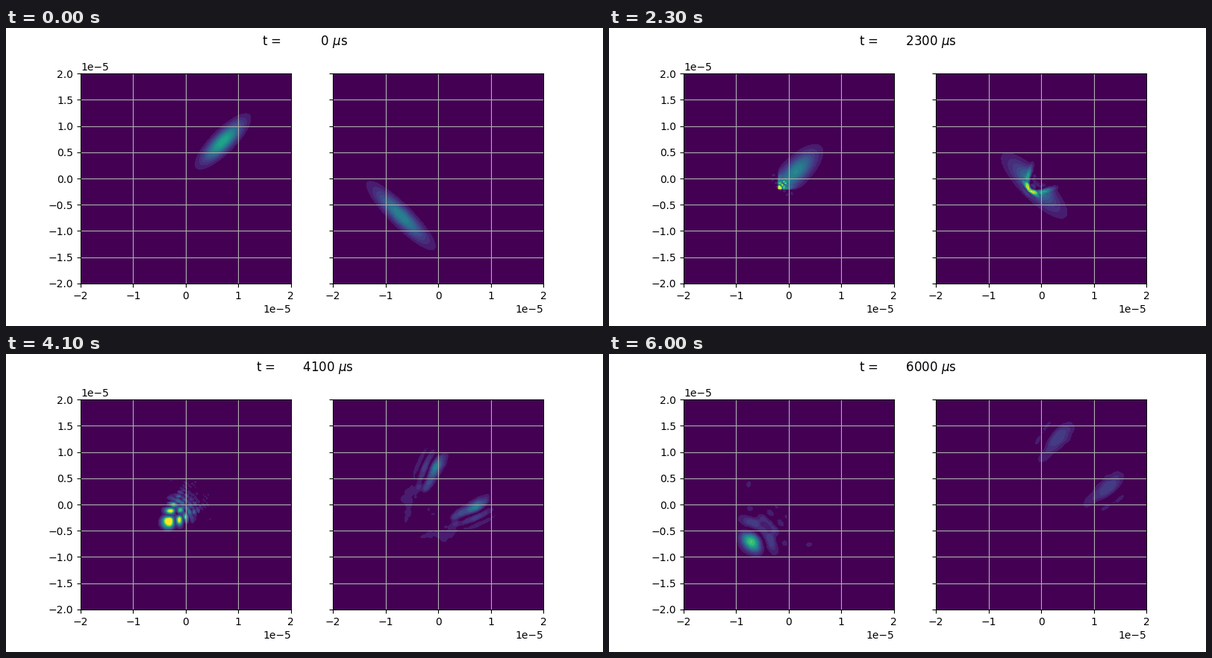
These frames come from a looping animation (800x400 px, 6100 ms). A matplotlib script:

```python
import numpy as np
import matplotlib.pyplot as plt
from matplotlib.animation import FuncAnimation

# Two matter waves that repel each other; lengths in um, times in ms.
FRAMES = 61
STEP = 0.1            # simulated time between frames
SUBSTEPS = 25
CONTACT = 1.2         # before this time the clouds do not overlap
HBAR_M = 0.73         # hbar / mass
SPEED = 2.5           # along each axis
OFFSET = 7.07
REPULSION = 75.0
N, HALF = 144, 22.0

axis = np.linspace(-HALF, HALF, N, endpoint=False)
X, Y = np.meshgrid(axis, axis)
k = 2 * np.pi * np.fft.fftfreq(N, axis[1] - axis[0])
K2 = k[None, :] ** 2 + k[:, None] ** 2


def packet(center, sigma_along, sigma_across, speed):
    """Gaussian cloud on the diagonal, moving along it."""
    along = (X + Y - 2 * center) / np.sqrt(2)
    across = (X - Y) / np.sqrt(2)
    peak = 1.92 / (sigma_along * sigma_across)
    shape = (along / sigma_along) ** 2 + (across / sigma_across) ** 2
    wave = np.exp(1j * speed / HBAR_M * (X + Y))
    return np.sqrt(peak) * np.exp(-shape / 4) * wave


def density(psi):
    return psi.real ** 2 + psi.imag ** 2


def drift(psi, phase):
    return np.fft.ifft2(np.fft.fft2(psi) * phase)


def simulate():
    psi = np.array([packet(OFFSET, 3.2, 1.0, -SPEED),
                    packet(-OFFSET, 1.0, 4.3, SPEED)])
    dt = STEP / SUBSTEPS
    free = np.exp(-0.5j * HBAR_M * K2 * STEP)
    full = np.exp(-0.5j * HBAR_M * K2 * dt)
    half = np.exp(-0.25j * HBAR_M * K2 * dt)
    history = [density(psi)]
    for frame in range(1, FRAMES):
        if frame * STEP <= CONTACT:
            psi = drift(psi, free)
        else:
            psi = drift(psi, half)
            for i in range(SUBSTEPS):
                # each cloud feels the density of the other one
                psi = psi * np.exp(-1j * dt * REPULSION * density(psi)[::-1])
                psi = drift(psi, full if i < SUBSTEPS - 1 else half)
        history.append(density(psi))
    return history


history = simulate()

fig, axes = plt.subplots(1, 2, sharey=True, figsize=(8, 4), dpi=100)
cmap = plt.get_cmap("viridis")
levels = np.linspace(0.05, 1, 20)
for ax in axes:
    ax.set_aspect("equal")
    ax.set_xlim(-2e-5, 2e-5)
    ax.set_ylim(-2e-5, 2e-5)
    ax.set_facecolor(cmap(0.0))
    ax.grid(True)
title = fig.suptitle("")
clouds = []


def draw(frame):
    while clouds:
        clouds.pop().remove()
    for ax, n in zip(axes, history[frame]):
        clouds.append(ax.contourf(axis * 1e-6, axis * 1e-6, n, levels,
                                  cmap=cmap, vmin=0, vmax=1, extend="max"))
        ax.set_xlim(-2e-5, 2e-5)
        ax.set_ylim(-2e-5, 2e-5)
    title.set_text(rf"t = {frame * 100:10d} $\mu$s")
    return clouds


anim = FuncAnimation(fig, draw, frames=FRAMES, interval=100, repeat=True)
plt.show()
```
